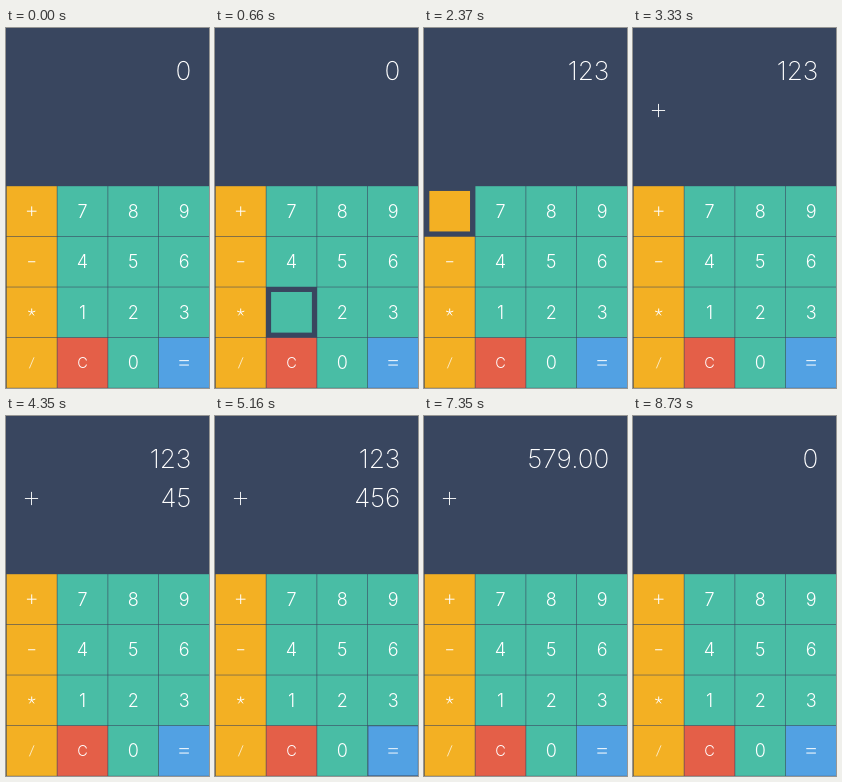
Recreate the animation shown at these times as an HTML page. Size 203x360 px, loop 8760 ms.

```html
<!DOCTYPE html>
<html lang="en">
<head>
<meta charset="utf-8">
<title>Calculator</title>
<style>
html, body { margin: 0; width: 100%; height: 100%; overflow: hidden; background: #39465f; }
svg { display: block; width: 100vw; height: 100vh; }
text { font-family: Inter, "Liberation Sans", sans-serif; fill: #fff; }
.key { font-size: 18px; font-weight: 300; text-anchor: middle; }
.line { font-size: 26.2px; font-weight: 200; text-anchor: end; }
path { fill: none; stroke: #fff; }
</style>
</head>
<body>
<svg id="stage" viewBox="0 0 203 360"></svg>
<script>
const LOOP = 8760, PRESS = 480;
const stage = document.getElementById('stage');
const colors = { op: '#f3b023', digit: '#49bda5', C: '#e45f48', '=': '#52a1e3' };
const marks = {
  '+': 'M-4.8 0H4.8M0-4.8V4.8',
  '-': 'M-3.6 0H3.6',
  '*': 'M0 0V-3.8M0 0L3.6-1.2M0 0L2.3 3.1M0 0L-2.3 3.1M0 0L-3.6-1.2',
  '/': 'M-2.3 5.5L2.3-5.5',
  '=': 'M-4.8-2.2H4.8M-4.8 2.2H4.8'
};
// Key, press start; the display reacts when the key is let go
const presses = [
  ['1', 360], ['2', 720], ['3', 1290], ['+', 2130], ['4', 3360],
  ['5', 3840], ['6', 4380], ['=', 5130], ['C', 7380]
];

function add(tag, attrs, parent = stage) {
  const node = document.createElementNS('http://www.w3.org/2000/svg', tag);
  for (const name in attrs) node.setAttribute(name, attrs[name]);
  return parent.appendChild(node);
}

const keys = {};
[...'+789-456*123/C0='].forEach((name, i) => {
  const col = i % 4, row = i >> 2;
  const x = 25.7 + col * 50.8, y = 183.2 + row * 50.55;
  const group = add('g', { transform: `translate(${x} ${y})` });
  const fill = colors[name] || (col ? colors.digit : colors.op);
  const box = add('rect', { x: -25.1, y: -25, width: 50.2, height: 50, fill }, group);
  let label;
  if (marks[name]) {
    label = add('path', { d: marks[name], 'stroke-width': name === '/' ? .7 : 1 }, group);
  } else {
    const isClear = name === 'C';
    label = add('text', { class: 'key', y: isClear ? 5.6 : 6.6 }, group);
    if (isClear) label.style.fontSize = '14.5px';
    label.textContent = name;
  }
  keys[name] = { box, label };
});

const top1 = add('text', { class: 'line', x: 185.4, y: 52 });
const top2 = add('text', { class: 'line', x: 185.4, y: 90.7 });
const plus = add('path', { d: 'M-6.6 0H6.6M0-6.6V6.6', transform: 'translate(25.5 82.5)' });

const clamp = v => Math.max(0, Math.min(1, v));
const smooth = v => v * v * (3 - 2 * v);

function displayAt(t) {
  let first = '0', second = '', operator = '';
  for (const [key, start] of presses) {
    if (t < start + PRESS * .8) break;
    if (key === '+') operator = key;
    else if (key === '=') [first, second] = [(+first + +second).toFixed(2), ''];
    else if (key === 'C') [first, second, operator] = ['0', '', ''];
    else if (operator) second += key;
    else first = first === '0' ? key : first + key;
  }
  return [first, second, operator];
}

function draw(now) {
  const t = now % LOOP;
  for (const [name, start] of presses) {
    const p = clamp((t - start) / PRESS);
    const depth = smooth(clamp(Math.min(p / .4, (1 - p) / .4)));
    keys[name].box.setAttribute('transform', `scale(${1 - .19 * depth})`);
    keys[name].label.setAttribute('opacity', clamp(1 - depth * 1.2));
  }
  const [first, second, operator] = displayAt(t);
  top1.textContent = first;
  top2.textContent = second;
  plus.setAttribute('opacity', operator ? .9 : 0);
}

const begin = performance.now();
function tick() {
  draw(performance.now() - begin);
  requestAnimationFrame(tick);
}
tick();
</script>
</body>
</html>
```
